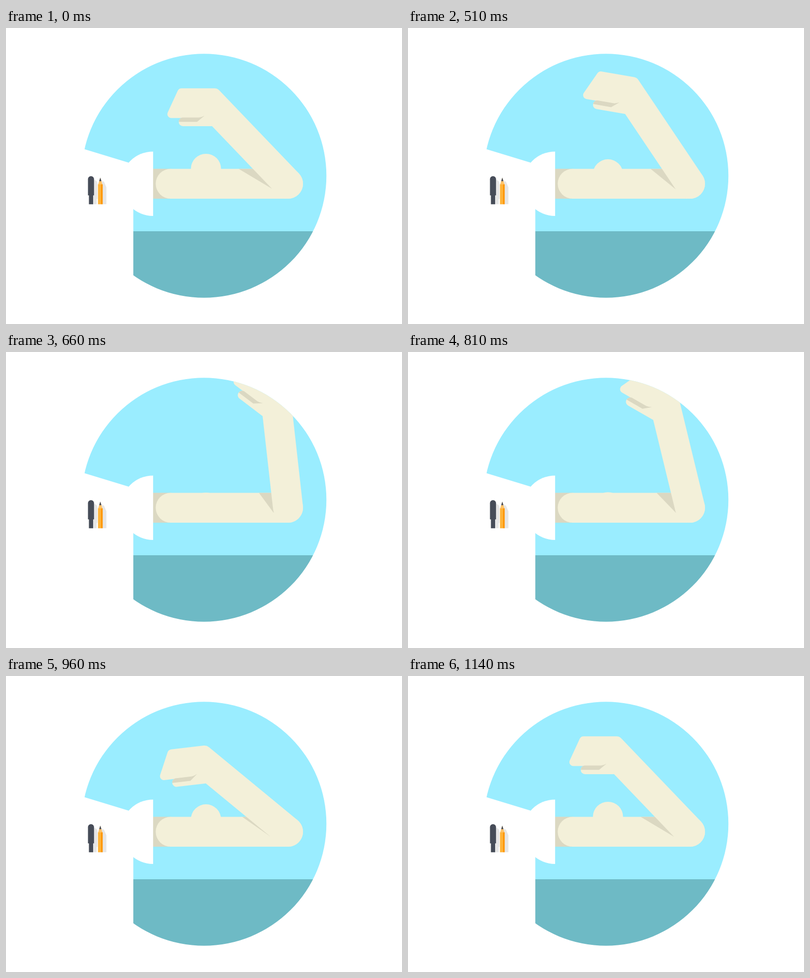
Write an HTML page with a canvas that moves like this. It is 800 px wide and 600 px high and loops after 2700 ms.

```html
<!DOCTYPE html>
<html lang="en">
<head>
<meta charset="utf-8">
<title>Flexing arm</title>
<style>
  html, body { margin: 0; width: 100%; height: 100%; overflow: hidden; background: #fff; }
  canvas { display: block; width: 800px; height: 600px; }
</style>
</head>
<body>
<canvas id="stage" width="800" height="600"></canvas>
<script>
const ctx = document.getElementById('stage').getContext('2d');
const LOOP = 2700, STEP = 30;
const SKY = '#9aedff', WATER = '#6ebac5', SKIN = '#f3f0d9', SHADE = '#dbd8c2';
const ELBOW = { x: 569.7, y: 315.7 }, R = 30.3, TOP = 285.4;
const REST = 46.3; // forearm direction at rest, degrees

const smooth = u => u * u * (3 - 2 * u);
const linear = u => u;

// Symmetric ease with long handles, solved by bisection
function strong(u) {
  let lo = 0, hi = 1;
  for (let i = 0; i < 24; i++) {
    const t = (lo + hi) / 2, s = 1 - t;
    if (1.8 * t * s * s + 1.2 * t * t * s + t * t * t < u) lo = t; else hi = t;
  }
  return smooth(lo);
}

// Keys are [position, value, ease into this key]
function track(keys, p) {
  if (p <= keys[0][0]) return keys[0][1];
  for (let i = 1; i < keys.length; i++) {
    const [a, from] = keys[i - 1], [b, to, ease = linear] = keys[i];
    if (p <= b) return from + (to - from) * ease((p - a) / (b - a));
  }
  return keys[keys.length - 1][1];
}

const SWING = [[360, 0], [390, 0.4], [510, 9.9, u => u * (0.4 + 0.6 * u)],
  [660, 37.3, u => u * (0.8 + 0.2 * u)], [730, 40.5, u => u * (2 - u)],
  [900, 4.75, u => u * u * (1.6 - 0.6 * u)], [985, -7.8, u => u * (2 - u)],
  [1050, 1.7, u => u * u * (2 - u)], [1080, 5.4, u => u * (2 - u)], [1140, 0, smooth]];
const BUMP = [[360, 0], [707, 33, strong], [750, 33], [1050, -2.5, smooth], [1140, 0, smooth]];
const CREASE = [[360, 470], [390, 473], [510, 490], [660, 511], [720, 513],
  [780, 509], [900, 482], [1050, 470]];
const TIP = [[-8, -24], [0, -15.2], [1.7, -12.5], [4.75, -9.8], [9.9, -6.6], [37.3, 6.4]];

function shape(color, build) {
  ctx.fillStyle = color;
  ctx.beginPath();
  build();
  ctx.fill();
}

function poly(color, ...pts) {
  shape(color, () => {
    pts.forEach(([x, y]) => ctx.lineTo(x, y));
    ctx.closePath();
  });
}

function rect(color, x, y, x2, y2) {
  ctx.fillStyle = color;
  ctx.fillRect(x, y, x2 - x, y2 - y);
}

function disc(color, x, y, r) {
  shape(color, () => ctx.arc(x, y, r, 0, Math.PI * 2));
}

function upperArm(time, swing) {
  rect(SHADE, 296, TOP, 334, 346);
  disc(SKIN, 404, 285.4 + Math.min(30, track(BUMP, time)), 30.5);
  shape(SKIN, () => {
    ctx.arc(332.8, ELBOW.y, R, Math.PI / 2, Math.PI * 1.5);
    ctx.arc(ELBOW.x, ELBOW.y, R, -Math.PI / 2, Math.PI / 2);
  });

  // The fold ends on the inner edge of the forearm
  const a = (REST + swing) * Math.PI / 180, c = Math.cos(a), s = Math.sin(a);
  const ex = ELBOW.x - s * R, ey = ELBOW.y + c * R, d = track(TIP, swing);
  const tip = [ex + c * d, ey + s * d];
  poly(SHADE, [track(CREASE, time), TOP], tip, [tip[0] + 4, tip[1] - 1],
    [ex - (ey - TOP) * c / s + 4, TOP]);
}

function forearm(swing) {
  const a = REST * Math.PI / 180, nx = Math.sin(a) * R, ny = Math.cos(a) * R;
  ctx.save();
  ctx.translate(ELBOW.x, ELBOW.y);
  ctx.rotate(swing * Math.PI / 180);
  ctx.translate(-ELBOW.x, -ELBOW.y);
  shape(SKIN, () => {
    ctx.arc(ELBOW.x, ELBOW.y, R, a - Math.PI / 2, a + Math.PI / 2);
    ctx.lineTo(ELBOW.x - nx, ELBOW.y + ny);
    ctx.lineTo(416.3, 199);
    ctx.arcTo(349, 199, 349, 185, 8.5);
    ctx.quadraticCurveTo(349, 184, 355, 182.5);
    ctx.arcTo(321.5, 182.5, 349.2, 122.3, 8);
    ctx.arcTo(349.2, 122.3, 427, 122.3, 9);
    ctx.arcTo(427, 122.3, ELBOW.x + nx, ELBOW.y - ny, 14);
    ctx.closePath();
  });
  shape(SHADE, () => {
    ctx.moveTo(349, 190.2);
    ctx.quadraticCurveTo(349.5, 183, 356, 181.5);
    ctx.lineTo(390, 181.5);
    ctx.quadraticCurveTo(395, 181, 401, 177.8);
    ctx.lineTo(386, 190.2);
    ctx.closePath();
  });
  ctx.restore();
}

function shirt() {
  shape('#fff', () => {
    ctx.moveTo(140, 240);
    ctx.lineTo(248, 273);
    ctx.lineTo(297.2, 300);
    ctx.lineTo(257.2, 360);
    ctx.lineTo(257.2, 560);
    ctx.lineTo(140, 560);
    ctx.closePath();
  });
  shape('#fff', () => ctx.arc(297.2, 315.7, 65.3, Math.PI / 2, Math.PI * 1.5));
}

function pocket() {
  const dark = '#464c58', gray = '#e6e6e6';
  shape(gray, () => {
    ctx.moveTo(176, 307.5);
    ctx.quadraticCurveTo(184.5, 308, 184.7, 315);
    ctx.lineTo(184.7, 346);
    ctx.lineTo(183.2, 347);
    ctx.lineTo(183.2, 357.3);
    ctx.lineTo(175, 357.3);
  });
  poly(gray, [194, 310], [198, 311.5], [202.8, 323], [202.8, 357.3], [194, 357.3]);
  shape(dark, () => ctx.roundRect(165.6, 300.2, 12.2, 39, [6.1, 6.1, 0, 0]));
  rect(dark, 167.5, 339, 176, 357.3);
  poly('#ffc36a', [185.8, 318], [190.5, 303.3], [195.3, 318]);
  poly(dark, [188.2, 310.4], [190.5, 303.3], [192.8, 310.4]);
  rect('#ffb43a', 185.8, 317, 192, 357.3);
  rect('#ff9500', 192, 317, 195.3, 357.3);
}

function draw(time) {
  const swing = track(SWING, time);
  rect('#fff', 0, 0, 800, 600);
  ctx.save();
  ctx.beginPath();
  ctx.arc(400, 299.5, 247.3, 0, Math.PI * 2);
  ctx.clip();
  rect(SKY, 0, 0, 800, 412);
  rect(WATER, 0, 412, 800, 600);
  upperArm(time, swing);
  forearm(swing);
  ctx.restore();
  shirt();
  pocket();
}

const start = performance.now();
function tick() {
  const time = (performance.now() - start) % LOOP;
  draw(Math.floor(time / STEP) * STEP);
  requestAnimationFrame(tick);
}
tick();
</script>
</body>
</html>
```
